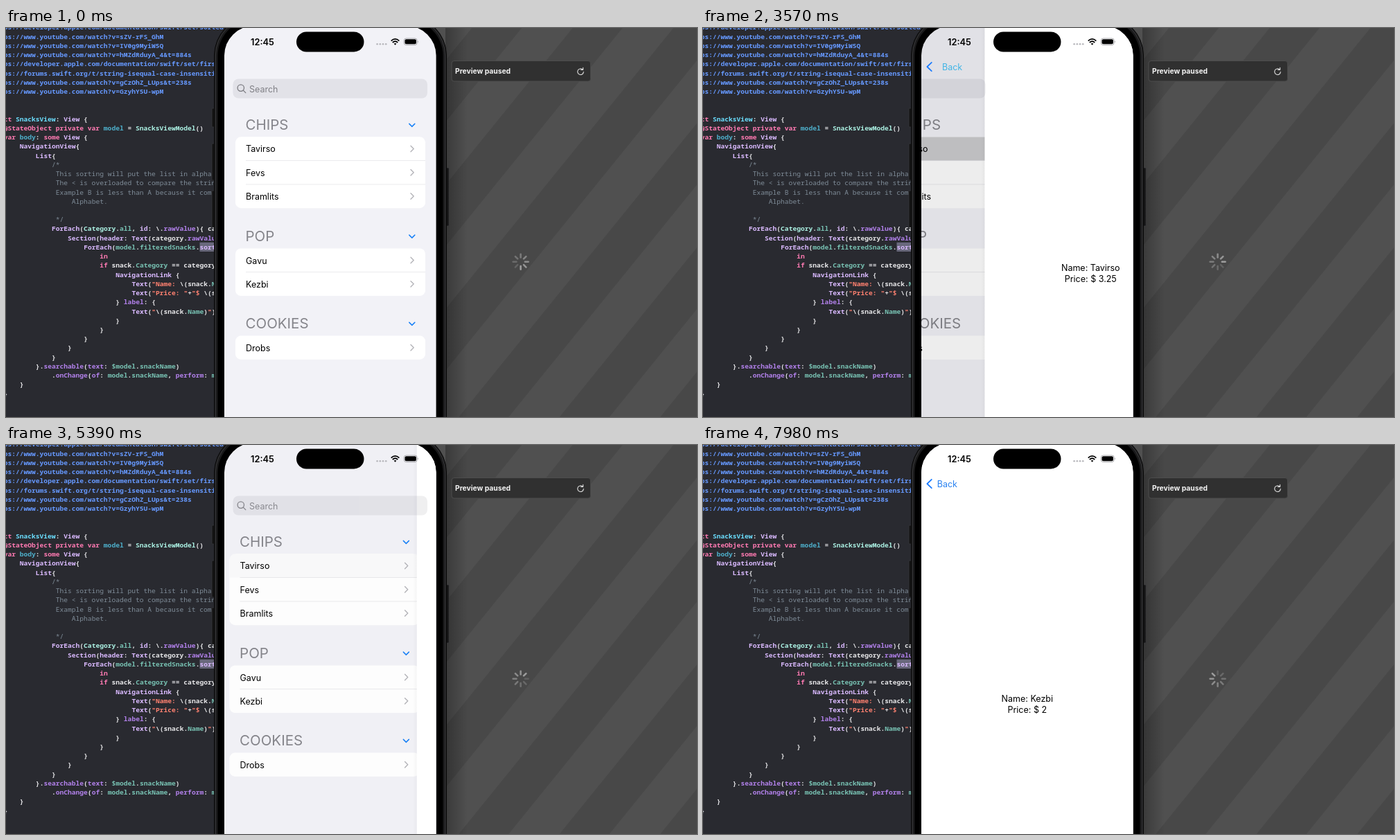
Write an HTML page that moves like this. It is 997 by 562 pixels and loops after 8000 ms.

```html
<!DOCTYPE html>
<html lang="en">
<head>
<meta charset="utf-8">
<title>Snack list preview</title>
<style>
html, body { margin: 0; width: 100%; height: 100%; overflow: hidden; background: #292a30; }
svg { display: block; width: 100vw; height: 100vh; }
text { white-space: pre; font-family: Inter, "Liberation Sans", sans-serif; }
.code { font: 600 9.62px "Noto Sans Mono", "DejaVu Sans Mono", monospace; }
.code text { font-family: inherit; }
</style>
</head>
<body>
<svg id="stage" viewBox="0 0 997 562" preserveAspectRatio="none">
  <defs>
    <pattern id="stripes" width="113" height="113" patternUnits="userSpaceOnUse" patternTransform="translate(664 10) rotate(39)">
      <rect width="113" height="113" fill="#505050"/>
      <rect width="56" height="113" fill="#484848"/>
    </pattern>
    <linearGradient id="shade">
      <stop offset="0" stop-color="#000" stop-opacity=".28"/>
      <stop offset="1" stop-color="#000" stop-opacity="0"/>
    </linearGradient>
    <linearGradient id="edge">
      <stop offset="0" stop-color="#000" stop-opacity="0"/>
      <stop offset="1" stop-color="#000" stop-opacity=".03"/>
    </linearGradient>
    <clipPath id="screen"><rect x="315" y="-3.2" width="305.6" height="640" rx="43"/></clipPath>
  </defs>

  <rect width="997" height="562" fill="#292a30"/>
  <rect x="279.5" y="309.8" width="40" height="13.2" fill="#69687c"/>
  <g id="code" class="code"></g>

  <rect x="600" width="397" height="562" fill="url(#stripes)"/>
  <rect x="634" width="32" height="562" fill="url(#shade)"/>
  <rect x="643" y="47.5" width="200.5" height="29.5" rx="3.5" fill="#303030" stroke="#4c4c4c"/>
  <text x="648" y="66.3" font-size="10.3" font-weight="700" fill="#f4f4f4">Preview paused</text>
  <g fill="none" stroke="#dcdcdc" stroke-width="1.1" stroke-linecap="round" stroke-linejoin="round">
    <path d="M833.3 63.4A4.3 4.3 0 1 1 831.9 60"/>
    <path d="M832.6 57.4V60.5H829.6"/>
  </g>
  <g id="spinner" stroke="#fff" stroke-width="2.5" stroke-linecap="round"></g>

  <g fill="#141415" stroke="#3c3c3e" stroke-width=".7">
    <rect x="297" y="116" width="5" height="27" rx="1.2"/>
    <rect x="297" y="167" width="5" height="53" rx="1.2"/>
    <rect x="297" y="235" width="5" height="53" rx="1.2"/>
    <rect x="634" y="202" width="5" height="84" rx="1.2"/>
  </g>
  <rect x="300.5" y="-17.5" width="335" height="700" rx="57.5" fill="#1a1a1b" stroke="#0a0a0a"/>
  <rect x="302.3" y="-15.7" width="331.4" height="700" rx="55.7" fill="none" stroke="#39393b"/>
  <rect x="305.5" y="-12.5" width="325" height="700" rx="52.5" fill="#000"/>

  <g clip-path="url(#screen)">
    <rect x="315" y="-4" width="306" height="567" fill="#f2f2f7"/>
    <g id="list"></g>
    <rect id="dim" x="315" y="-4" width="306" height="567"/>
    <g id="detail">
      <rect x="309" y="-4" width="6" height="567" fill="url(#edge)"/>
      <rect x="315" y="-4" width="306" height="567" fill="#fff"/>
      <g id="info" font-size="12.5" text-anchor="middle">
        <text id="name" x="467.8" y="370.5"></text>
        <text id="price" x="467.8" y="386.5"></text>
      </g>
    </g>
    <g id="search">
      <rect x="327.5" y="73.5" width="280.5" height="28" rx="8" fill="#767680" fill-opacity=".13"/>
      <g fill="none" stroke="#7c7c82" stroke-width="1.3" stroke-linecap="round">
        <circle cx="338.8" cy="86.6" r="4.7"/><path d="M342.3 90.1L345.8 93.6"/>
      </g>
      <text x="351" y="92.6" font-size="12.5" fill="#808086">Search</text>
    </g>
    <path id="chev" d="M329.8 49.8L323.4 56L329.8 62.2" fill="none" stroke="#1a7bff" stroke-width="1.8" stroke-linecap="round" stroke-linejoin="round"/>
    <text id="back" font-size="12.5" fill="#2a82f0">Back</text>
  </g>

  <rect x="419" y="5.5" width="97.5" height="29" rx="14.5"/>
  <text x="353" y="24.6" font-size="12.8" font-weight="600">12:45</text>
  <g fill="#b6b6bb">
    <circle cx="535.6" cy="23.2" r="1.3"/><circle cx="539.8" cy="23.2" r="1.3"/>
    <circle cx="544" cy="23.2" r="1.3"/><circle cx="548.2" cy="23.2" r="1.3"/>
  </g>
  <g fill="none" stroke="#000" stroke-width="1.8">
    <path d="M555.7 18.6Q561.5 13.2 567.3 18.6"/>
    <path d="M557.8 21Q561.5 17.6 565.2 21"/>
  </g>
  <path d="M559.6 22.6Q561.5 21.2 563.4 22.6L561.5 24.7Z"/>
  <rect x="574.2" y="15" width="19" height="9.6" rx="3.2" fill="none" stroke="#98989c" stroke-width=".8"/>
  <rect x="575.5" y="16.3" width="16.4" height="7" rx="2"/>
  <path d="M594.2 18.2Q595.8 19.8 594.2 21.4Z" fill="#98989c"/>
</svg>

<script>
const $ = id => document.getElementById(id);
function add(parent, tag, attrs, text) {
  const el = document.createElementNS("http://www.w3.org/2000/svg", tag);
  for (const key in attrs) el.setAttribute(key, attrs[key]);
  if (text !== undefined) el.textContent = text;
  parent.appendChild(el);
  return el;
}

// Editor: [row, column, text]; "~x" switches to colour x.
const ink = {
  u: "#6699ff", k: "#ff7ab2", n: "#6bdfff", t: "#dabaff", v: "#4eb0cc", c: "#acf2e4",
  m: "#78c2b3", f: "#b281eb", s: "#ff8170", g: "#7f8c98", p: "#e6e6e8"
};
const lines = [
  [0, 4, "~ups://developer.apple.com/documentation/swift/set/sorted"],
  [1, 4, "~ups://www.youtube.com/watch?v=sZV-rFS_GhM"],
  [2, 4, "~ups://www.youtube.com/watch?v=IV0g9MyiW5Q"],
  [3, 4, "~ups://www.youtube.com/watch?v=hMZdRduyA_4&t=884s"],
  [4, 4, "~ups://developer.apple.com/documentation/swift/set/first"],
  [5, 4, "~ups://forums.swift.org/t/string-isequal-case-insensitive"],
  [6, 4, "~ups://www.youtube.com/watch?v=gCzOhZ_LUps&t=238s"],
  [7, 4, "~ups://www.youtube.com/watch?v=GzyhY5U-wpM"],
  [10, 0, "~kstruct ~nSnacksView~p: ~tView ~p{"],
  [11, 4, "~k@StateObject private var ~vmodel ~p= ~cSnacksViewModel~p()"],
  [12, 4, "~kvar ~vbody~p: ~ksome ~tView ~p{"],
  [13, 8, "~tNavigationView~p{"],
  [14, 12, "~tList~p{"],
  [15, 16, "~g/*"],
  [16, 17, "~gThis sorting will put the list in alphabetical"],
  [17, 17, "~gThe < is overloaded to compare the strings"],
  [18, 17, "~gExample B is less than A because it comes"],
  [19, 21, "~gAlphabet."],
  [21, 17, "~g*/"],
  [22, 16, "~tForEach~p(~cCategory~p.~mall~p, ~tid~p: \\.~frawValue~p){ category"],
  [23, 20, "~tSection~p(~theader~p: ~tText~p(~pcategory.~frawValue~p"],
  [24, 24, "~tForEach~p(~mmodel~p.~mfilteredSnacks~p.~tsorted"],
  [25, 28, "~kin"],
  [26, 28, "~kif ~psnack.~mCategory ~p== category"],
  [27, 32, "~tNavigationLink ~p{"],
  [28, 36, "~tText~p(~s\"Name: ~p\\(snack.~mName~p)"],
  [29, 36, "~tText~p(~s\"Price: \"~p+~s\"$ ~p\\(snack"],
  [30, 32, "~p} ~flabel~p: {"],
  [31, 36, "~tText~p(~s\"~p\\(snack.~mName~p)~s\"~p)"],
  [32, 32, "~p}"], [33, 28, "~p}"], [34, 24, "~p}"], [35, 20, "~p}"], [36, 16, "~p}"],
  [37, 12, "~p}.~fsearchable~p(~ftext~p: ~m$model~p.~msnackName~p)"],
  [38, 16, "~p.~fonChange~p(~fof~p: ~mmodel~p.~msnackName~p, ~fperform~p: ~mmodel"],
  [39, 8, "~p}"], [40, 4, "~p}"]
];
const weight = { k: 700, g: 500 };
for (const [row, col, src] of lines) {
  const line = add($("code"), "text", { x: -26.4 + col * 5.772, y: 2.4 + row * 13.23 });
  const parts = src.split(/~([a-z])/);
  for (let i = 1; i < parts.length; i += 2)
    add(line, "tspan", { fill: ink[parts[i]], "font-weight": weight[parts[i]] || 600 }, parts[i + 1]);
}

// Snack list
const rowH = 34.3, rows = {};
const sections = [
  ["CHIPS", 140, 157.3, ["Tavirso", "Fevs", "Bramlits"]],
  ["POP", 300.7, 318.4, ["Gavu", "Kezbi"]],
  ["COOKIES", 427, 444.6, ["Drobs"]]
];
const list = $("list");
sections.forEach(([title, mid, top, items], s) => {
  const box = { x: 331, y: top, width: 274, height: rowH * items.length, rx: 8 };
  const clip = add(list, "clipPath", { id: "card" + s });
  add(clip, "rect", box);
  add(list, "text", { x: 345.5, y: mid + 7.4, "font-size": 20.5, fill: "#85858b" }, title);
  add(list, "path", {
    d: `M581.8 ${mid - 1.6}l4 4l4 -4`, fill: "none", stroke: "#1a82f7",
    "stroke-width": 1.5, "stroke-linecap": "round", "stroke-linejoin": "round"
  });
  add(list, "rect", { ...box, fill: "#fff" });
  items.forEach((item, i) => {
    const y = top + rowH * i, cy = y + rowH / 2;
    if (i) add(list, "rect", { x: 346, y: y - .3, width: 259, height: .7, fill: "#e2e2e5" });
    rows[item] = add(list, "rect", {
      x: 331, y, width: 274, height: rowH, fill: "#cccccf", "clip-path": `url(#card${s})`, opacity: 0
    });
    add(list, "text", { x: 346, y: cy + 5, "font-size": 12.5 }, item);
    add(list, "path", {
      d: `M584 ${cy - 4.2}l4.2 4.2l-4.2 4.2`, fill: "none", stroke: "#b4b4b9",
      "stroke-width": 1.4, "stroke-linecap": "round", "stroke-linejoin": "round"
    });
  });
});

const spokes = Array.from({ length: 8 }, (_, i) =>
  add($("spinner"), "path", { d: "M0 -6.2V-11", transform: `translate(742.6 337.8) rotate(${i * 45})` }));

// Navigation
const moves = [
  { at: 3382, push: true, item: "Tavirso", price: "3.25" },
  { at: 5083, push: false, item: "Tavirso", price: "3.25" },
  { at: 6785, push: true, item: "Kezbi", price: "2" }
];
const loop = 8000, step = 70, width = 306;
const clamp = v => Math.min(1, Math.max(0, v));
function spring(ms) {
  if (ms <= 0) return 0;
  const w = ms * .013, v = 1 - (1 + w) * Math.exp(-w);
  return v > .998 ? 1 : v;
}
const shift = (el, x, y = 0) => el.setAttribute("transform", `translate(${x} ${y})`);
const fade = (el, v) => el.setAttribute("opacity", clamp(v));

function draw(t) {
  const move = moves.filter(m => t >= m.at - step).pop();
  const age = move ? t - move.at : 0, q = spring(age);
  const push = !move || move.push;
  const p = !move ? 0 : push ? q : 1 - q;

  shift(list, -p * width * .3);
  fade($("dim"), p * .1);
  shift($("detail"), (1 - p) * width);
  $("detail").style.display = p ? "" : "none";
  for (const key in rows) fade(rows[key], move && key === move.item ? (push ? 1 : p) : 0);
  if (move) {
    $("name").textContent = "Name: " + move.item;
    $("price").textContent = "Price: $ " + move.price;
  }
  shift($("info"), 0, push && age < 420 ? -20 : 0);

  shift($("search"), push ? -width * Math.pow(p, 1.19) : 0);
  fade($("search"), push ? 1 : (q - .45) / .5);
  fade($("chev"), push ? p * 1.6 - .14 : 1 - q * 3);
  fade($("back"), push ? p * 1.6 - .14 : 1 - q * 2.2);
  $("back").setAttribute("fill", push && p < .9 ? "#3fb4e6" : push ? "#2a82f0" : q > .1 ? "#7a7aee" : "#2a82f0");
  $("back").setAttribute("transform", push
    ? `translate(${337.7 + 24.5 * (1 - p)} 60.5)`
    : `translate(${337.7 - 8 * q} ${60.5 + 30 * q}) scale(${1 + .75 * q})`);

  const head = 4.5 + t / 950 * 8;
  spokes.forEach((el, i) => fade(el, .5 - .38 * ((((head - i) % 8) + 8) % 8) / 8));
}

function tick() {
  const t = performance.now() % loop;
  draw(Math.floor(t / step) * step);
  requestAnimationFrame(tick);
}
tick();
</script>
</body>
</html>
```
